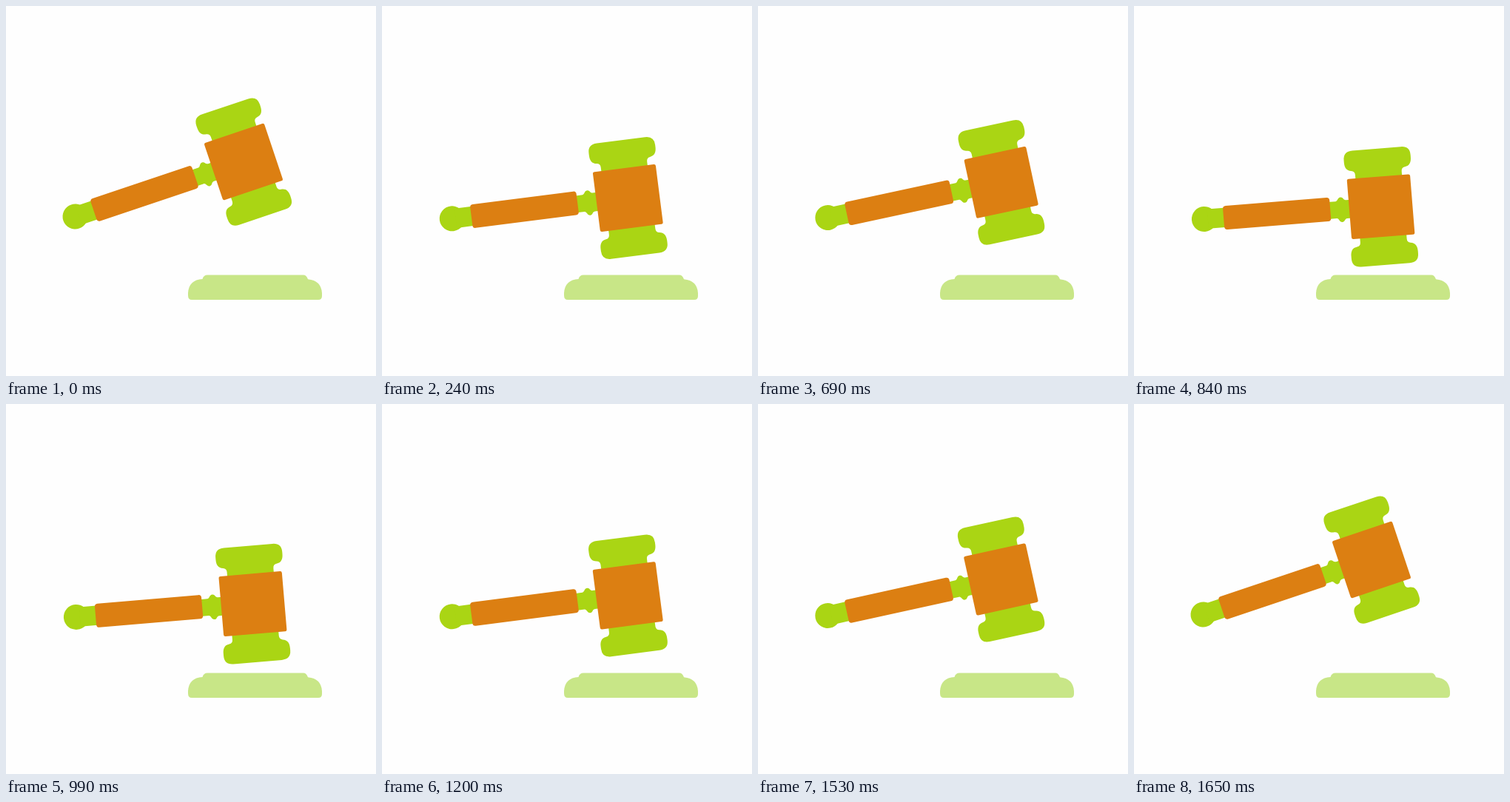
Recreate the animation shown at these times as an HTML page. Size 500 by 500 pixels, loop 1.71 s.

```html
<!DOCTYPE html>
<html lang="en">
<head>
<meta charset="utf-8">
<title>Gavel</title>
<style>
  html, body { margin: 0; height: 100%; overflow: hidden; background: #fefefe; }
  svg { display: block; width: 100%; height: 100%; }
  .green { fill: #aad514; }
  .orange { fill: #dc7f12; }
  .block { fill: #c8e687; }
</style>
</head>
<body>
<svg viewBox="0 0 500 500">
  <defs>
    <path id="cap" d="M223.3 -38 V-46 Q223.3 -51 218.5 -51.7 C212 -52.5 209.6 -57 209.6 -64 V-67 Q209.6 -79 222 -79 H287.5 Q300 -79 300 -67 V-64 C300 -57 297.5 -52.5 291 -51.7 Q286.3 -51 286.3 -46 V-38 Z"/>
  </defs>
  <path class="block" d="M246 391 V388 Q247 370 265.5 369 Q267 363.5 272 363.5 H402 Q406 363.5 408 369.3 Q426 371 427 388 V392 Q427 397 422 397 H251 Q246 397 246 391 Z"/>
  <!-- Drawn level, with the pivot at the origin -->
  <g id="gavel">
    <g class="green">
      <circle cx="15.2" cy="-2.8" r="17"/>
      <rect x="20" y="-15.9" width="26" height="26.4"/>
      <path d="M183 -12.3 H194 C197 -12.5 197 -17.4 201 -17.4 S204 -13.4 208 -13.2 H214 V11.8 H208 C204 12 205 16.2 201 16.2 S197 10.8 194 10.6 H183 Z"/>
      <use href="#cap"/>
      <use href="#cap" transform="translate(-.4 -.5) scale(1 -1)"/>
    </g>
    <g class="orange">
      <rect x="41.4" y="-18.5" width="144.6" height="32.2" rx="4"/>
      <rect x="211.6" y="-41.1" width="85.6" height="81.5" rx="2.5"/>
    </g>
  </g>
</svg>
<script>
  const STEP = 30, LOOP = 1710;
  // [step, degrees]: three strikes with shrinking rebounds, then back up
  const swing = [[0, -18.6], [12, -1.6], [22, -13.6], [30, -1.6], [38, -10.3], [44, -1.6], [55, -18.6], [57, -18.6]];
  const gavel = document.getElementById('gavel');

  function angleAt(step) {
    const i = swing.findIndex(([end]) => end > step);
    const [s0, a0] = swing[i - 1], [s1, a1] = swing[i];
    return a0 + (a1 - a0) * (step - s0) / (s1 - s0);
  }

  const start = performance.now();
  function draw() {
    const time = Math.max(0, performance.now() - start) % LOOP;
    const angle = angleAt(Math.floor(time / STEP));
    gavel.setAttribute('transform', `translate(80 292) rotate(${angle})`);
    requestAnimationFrame(draw);
  }
  draw();
</script>
</body>
</html>
```
